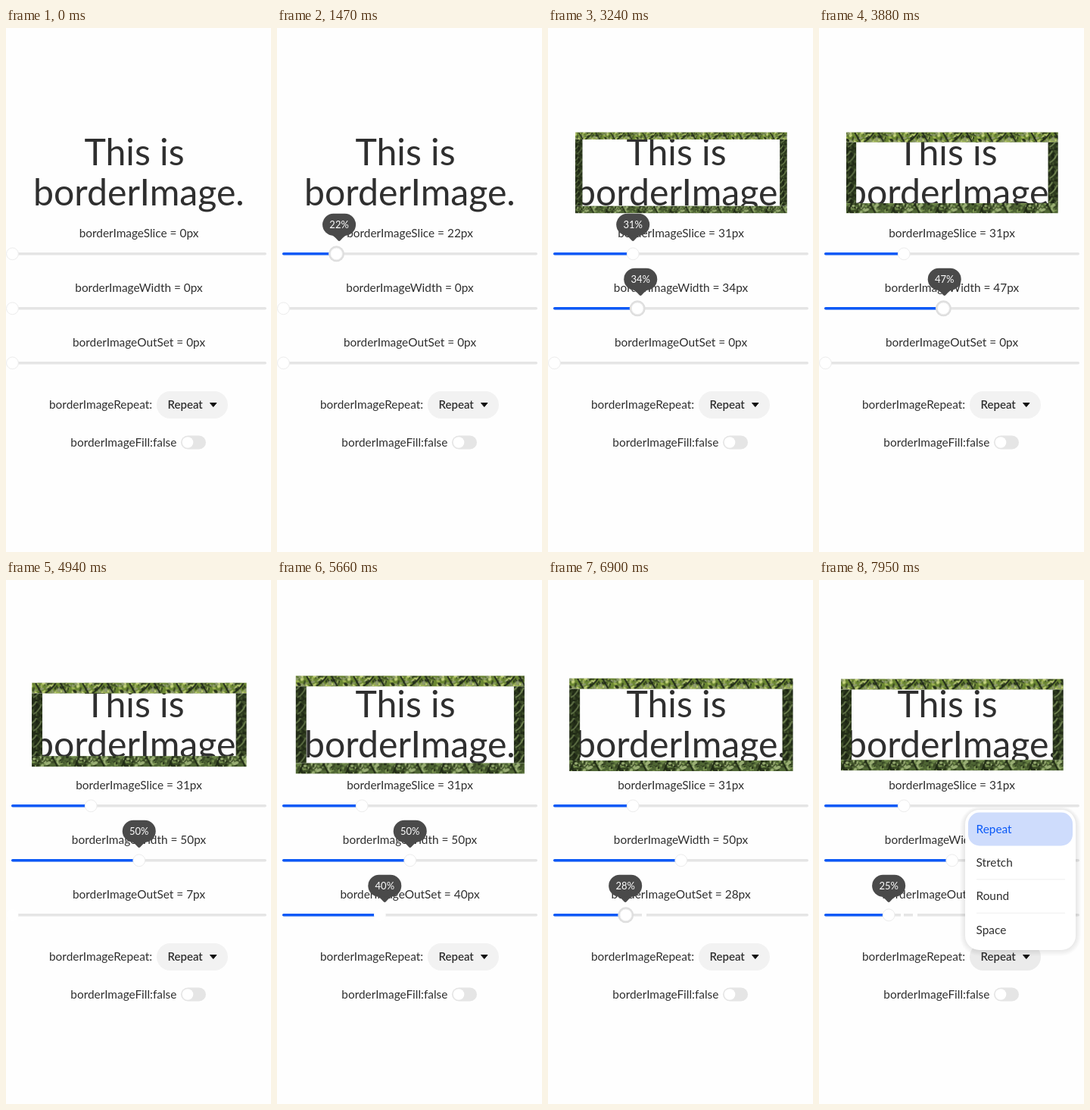
Recreate the animation shown at these times as an HTML page. Size 350 px wide and 691 px high, loop 7.99 s.

```html
<!DOCTYPE html>
<html lang="en">
<head>
<meta charset="utf-8">
<title>borderImage</title>
<style>
  html, body { margin: 0; width: 100%; height: 100%; overflow: hidden; background: #fefefe; }
  svg { display: block; width: 350px; height: 691px; font: 15.4px Lato, "Open Sans", sans-serif; fill: #2f2f2f; }
  .title { font-size: 48.2px; }
  .mid { text-anchor: middle; }
  .strong { font-weight: 600; font-size: 15px; }
  .tip { font-size: 13px; fill: #fff; }
</style>
</head>
<body>
<svg id="stage" viewBox="0 0 350 691" xmlns="http://www.w3.org/2000/svg"></svg>
<script>
const LOOP = 7990;
const LAG = 30;      // the thumb trails the finger
const PX = 0.28;     // stage pixels per device pixel
const BOX = { l: 36, t: 137.5, r: 315.7, b: 244.2 };
const BLUE = '#0a59f7';
const stage = document.getElementById('stage');

function el(parent, tag, attrs = {}, text) {
  const node = document.createElementNS(stage.namespaceURI, tag);
  set(node, attrs);
  if (text) node.textContent = text;
  parent.appendChild(node);
  return node;
}
function set(node, attrs) {
  for (const k in attrs) node.setAttribute(k, attrs[k]);
}
function show(node, on) {
  node.style.display = on ? '' : 'none';
}
function rng(seed) {
  return () => (seed = (seed * 16807) % 2147483647) / 2147483647;
}

// Piecewise linear value through [time, value] points
function track(points, t) {
  if (t <= points[0][0]) return points[0][1];
  for (let i = 1; i < points.length; i++) {
    const [t0, v0] = points[i - 1], [t1, v1] = points[i];
    if (t < t1) return v0 + (v1 - v0) * (t - t0) / (t1 - t0);
  }
  return points[points.length - 1][1];
}

// Foliage tiles for the four edges
const defs = el(stage, 'defs');
function foliage(id, w, h, seed, tones, branches, bark) {
  const tile = el(defs, 'pattern', { id, width: w, height: h, patternUnits: 'userSpaceOnUse' });
  const rnd = rng(seed);
  el(tile, 'rect', { width: w, height: h, fill: tones[0] });
  for (let i = 0; i < w * h / 9; i++) {
    const x = rnd() * w, y = rnd() * h;
    el(tile, 'ellipse', {
      cx: x, cy: y, rx: 1 + rnd() * 2.6, ry: 0.6 + rnd() * 1.5,
      transform: `rotate(${rnd() * 180} ${x} ${y})`,
      fill: tones[1 + Math.floor(rnd() * (tones.length - 1))]
    });
  }
  branches.forEach(d => el(tile, 'path', { d, fill: 'none', stroke: bark, 'stroke-width': 2 }));
  return tile;
}
const leaf = ['#6b8732', '#9db450', '#c3d27c', '#3b4b22', '#5a7330', '#8d9a6c', '#27331a'];
const grass = ['#4f6634', '#7b9552', '#2b3819', '#9aaf74', '#3b4a26', '#222d16'];
const shade = ['#222c16', '#2c3a1d', '#1a2213', '#3f4f2a', '#1e2814'];
const sides = ['M2 19Q9 16 13 6', 'M0 9Q4 7 6 2'];
const tiles = {
  top: foliage('top', 62, 14, 17, leaf, ['M18 0L26 14', 'M31 14Q42 6 45 0', 'M51 0L59 14'], '#20291a'),
  bottom: foliage('bottom', 62, 14, 91, grass, ['M8 14L14 0', 'M40 0L47 14'], '#1f2a14'),
  left: foliage('left', 14, 22, 43, shade, sides, '#5d6f44'),
  right: foliage('right', 14, 22, 77, shade, sides, '#6f8350')
};

// Heading and its image border
el(stage, 'text', { x: 169.5, y: 180.7, class: 'title mid' }, 'This is');
el(stage, 'text', { x: 175.4, y: 234, class: 'title mid' }, 'borderImage.');
const frame = el(stage, 'g');
const edges = {};
for (const side in tiles) edges[side] = el(frame, 'rect', { fill: `url(#${side})` });

function place(side, x, y, width, height, tx, ty, k) {
  set(edges[side], { x, y, width, height });
  set(tiles[side], { patternTransform: `translate(${tx} ${ty}) scale(${k})` });
}
function drawFrame(width, outset) {
  show(frame, width > 0);
  if (!width) return;
  const o = outset * PX, b = width * PX, k = width / 50;
  const x = BOX.l - o, y = BOX.t - o;
  const w = BOX.r - BOX.l + 2 * o, h = BOX.b - BOX.t + 2 * o;
  const tx = x + w / 2 - 31 * k, ty = y + h / 2 - 11 * k;
  const inner = Math.max(0, h - 2 * b);
  place('top', x, y, w, b, tx, y, k);
  place('bottom', x, y + h - b, w, b, tx, y + h - b, k);
  place('left', x, y + b, b, inner, x, ty, k);
  place('right', x + w - b, y + b, b, inner, x + w - b, ty, k);
}

// Sliders
const posX = v => 8.5 + 3.345 * v;
function slider(name, y, opts) {
  const label = el(stage, 'text', { x: 175.5, y: y - 21.8, class: 'mid' });
  const line = { x: 7, y: y - 1.8, height: 3.6, rx: 1.8 };
  el(stage, 'rect', { ...line, width: 337, fill: '#e5e5e5' });
  const fill = el(stage, 'rect', { ...line, fill: BLUE });
  const gaps = (opts.gaps || []).map(([x, width, from, to]) => ({
    from, to, node: el(stage, 'rect', { x, y: y - 3, width, height: 6, fill: '#fefefe' })
  }));
  const ring = el(stage, 'circle', { cy: y, r: 10.5, fill: '#dedede' });
  const thumb = el(stage, 'circle', { cy: y, r: 7.9, fill: '#fff' });
  const tip = el(stage, 'g', { fill: '#4a4a4a' });
  el(tip, 'path', { d: 'M-12 -26Q-7 -24 -1.5 -17.5Q0 -16 1.5 -17.5Q7 -24 12 -26Z' });
  el(tip, 'rect', { x: -22, y: -53, width: 44, height: 29, rx: 14.5 });
  const tipText = el(tip, 'text', { y: -34, class: 'tip mid' });
  const [plainFrom, plainTo] = opts.plain || [0, 0];

  return t => {
    const v = Math.round(track(opts.points, t));
    const x = posX(track(opts.points, t - LAG));
    const plain = t >= plainFrom && t < plainTo;
    label.textContent = `${name} = ${v}px`;
    set(fill, { width: Math.max(0, x - 7) });
    show(fill, x > 9);
    gaps.forEach(g => show(g.node, t >= g.from && t < g.to));
    set(ring, { cx: x });
    show(ring, !plain && t >= opts.press[0] && t < opts.press[1]);
    set(thumb, { cx: x, stroke: plain ? 'none' : '#ececec' });
    set(tip, { transform: `translate(${posX(v)} ${y})` });
    show(tip, t >= opts.tip[0] && t < opts.tip[1]);
    tipText.textContent = v + '%';
    return v;
  };
}
const slice = slider('borderImageSlice', 297.8, {
  points: [[950, 0], [1200, 12], [1470, 22], [1710, 28], [2030, 31]],
  press: [950, 2030], tip: [950, 3730]
});
const width = slider('borderImageWidth', 369.8, {
  points: [[2720, 0], [3000, 24], [3240, 34], [3480, 43], [4200, 50]],
  press: [2720, 4200], tip: [2720, 5900]
});
const outset = slider('borderImageOutSet', 441.8, {
  points: [[4939, 0], [4940, 7], [5600, 36], [5660, 40], [5700, 45], [5900, 51],
    [6100, 49], [6260, 42], [6300, 39], [6500, 32], [7180, 25]],
  press: [4940, 7180], tip: [4980, LOOP], plain: [4940, 5740],
  gaps: [[184, 6, 5980, 6540], [108, 4, 6900, LOOP], [124, 6, 6540, LOOP]]
});

// Select button and toggle
el(stage, 'text', { x: 57, y: 502 }, 'borderImageRepeat:');
const button = el(stage, 'rect', { x: 199, y: 479, width: 94, height: 36, rx: 18 });
el(stage, 'text', { x: 213.5, y: 502, class: 'strong' }, 'Repeat');
el(stage, 'path', { d: 'M269.5 494.5H278L273.8 499.5Z', fill: '#111', stroke: '#111', 'stroke-linejoin': 'round' });
el(stage, 'text', { x: 85.3, y: 551.5 }, 'borderImageFill:false');
el(stage, 'rect', { x: 231, y: 537.5, width: 33, height: 18, rx: 9, fill: '#e5e5e5' });
el(stage, 'circle', { cx: 240, cy: 546.5, r: 7.3, fill: '#fff' });

// Popup menu
const menu = el(stage, 'g');
for (let i = 7; i > 0; i--) {
  el(menu, 'rect', {
    x: 193 - i, y: 303 - i * 0.6, width: 146 + 2 * i, height: 185 + i * 1.7,
    rx: 19 + i, fill: '#000', opacity: 0.012
  });
}
el(menu, 'rect', { x: 193, y: 303, width: 146, height: 185, rx: 19, fill: '#fff' });
el(menu, 'rect', { x: 197, y: 306.5, width: 138, height: 44, rx: 15, fill: '#cedcfc' });
['Repeat', 'Stretch', 'Round', 'Space'].forEach((name, i) => {
  const y = 333.5 + i * 44.4;
  el(menu, 'text', { x: 207.5, y, fill: i ? '#2f2f2f' : BLUE }, name);
  if (i > 1) el(menu, 'rect', { x: 208, y: y - 28, width: 117, height: 1, fill: '#eee' });
});

function draw(t) {
  slice(t);
  drawFrame(width(t), outset(t));
  set(button, { fill: t >= 7670 ? '#ebebeb' : '#f2f2f2' });
  const step = Math.min(4, Math.floor((t - 7830) / 40) + 1);
  show(menu, step > 0);
  if (step > 0) {
    const s = 0.88 + 0.03 * step;
    set(menu, { opacity: step / 4, transform: `translate(266 488) scale(${s}) translate(-266 -488)` });
  }
}

const start = performance.now();
function tick() {
  draw((performance.now() - start) % LOOP);
  requestAnimationFrame(tick);
}
tick();
</script>
</body>
</html>
```
